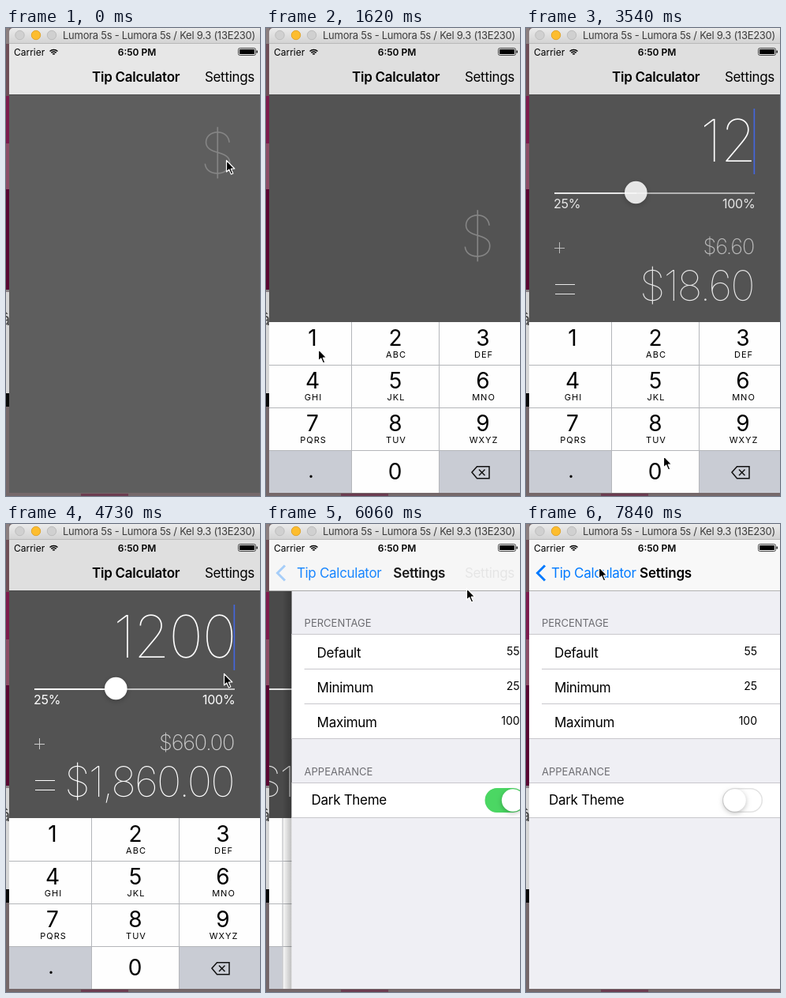
An HTML page with a canvas that plays this animation: 322x592 px, repeating every 8000 ms.

```html
<!DOCTYPE html>
<html lang="en">
<head>
<meta charset="utf-8">
<title>Tip Calculator</title>
<style>
  html, body { margin: 0; width: 100%; height: 100%; overflow: hidden; }
  canvas { display: block; }
</style>
</head>
<body>
<canvas id="stage" width="322" height="592"></canvas>
<script>
const ctx = document.getElementById('stage').getContext('2d');
const LOOP = 8000, TICK = 147.5, LEFT = 4, WIDTH = 320;
const BLUE = '#007aff';

const clamp = v => Math.max(0, Math.min(1, v));
const ramp = (t, start, length) => clamp((t - start) / length);
const smooth = u => u * u * (3 - 2 * u);
const easeOut = u => 1 - (1 - u) ** 3;
const mix = (a, b, u) => a + (b - a) * u;
const gray = v => `rgb(${v},${v},${v})`;

// time, x, y of the pointer tip
const pointerPath = [
  [0, 279, 167], [740, 279, 167], [1622, 66, 406], [1910, 59, 404], [2300, 59, 404],
  [2750, 163, 404], [3020, 163, 404], [3540, 174, 541], [3690, 170, 556], [4430, 170, 556],
  [4720, 276, 189], [5010, 307, 110], [5600, 258, 70], [5900, 258, 70], [6047, 254, 81],
  [6800, 257, 341], [6950, 255, 342], [7260, 255, 342], [7800, 92, 54]
];

function rect(x, y, w, h, color) {
  ctx.fillStyle = color;
  ctx.fillRect(x, y, w, h);
}

function shape(fill, stroke, lineWidth = 1) {
  if (fill) { ctx.fillStyle = fill; ctx.fill(); }
  if (stroke) { ctx.strokeStyle = stroke; ctx.lineWidth = lineWidth; ctx.stroke(); }
}

function circle(x, y, r, fill, stroke) {
  ctx.beginPath();
  ctx.arc(x, y, r, 0, 7);
  shape(fill, stroke);
}

function polyline(points, fill, stroke, lineWidth, closed) {
  ctx.beginPath();
  points.forEach(([x, y]) => ctx.lineTo(x, y));
  if (closed) ctx.closePath();
  shape(fill, stroke, lineWidth);
}

function text(str, x, y, size, { weight = 400, color = '#000', align = 'left', spacing = 0 } = {}) {
  ctx.font = `${weight} ${size}px Inter, sans-serif`;
  ctx.letterSpacing = spacing + 'px';
  ctx.textAlign = align;
  ctx.fillStyle = color;
  ctx.fillText(str, x, y);
}

function layer(alpha, draw, dx = 0, dy = 0) {
  ctx.save();
  ctx.globalAlpha *= alpha;
  ctx.translate(dx, dy);
  draw();
  ctx.restore();
}

function knob(x, y) {
  ctx.save();
  ctx.shadowColor = 'rgba(0,0,0,.25)';
  ctx.shadowBlur = 6;
  ctx.shadowOffsetY = 2;
  circle(x, y, 14.3, '#fff');
  ctx.restore();
}

function desktop() {
  rect(0, 0, 322, 592, '#75686a');
  const bands = [[0, 20, '#8b7f80'], [20, 66, '#6f4f58'], [86, 60, '#7c1b4d'], [146, 58, '#8c4e66'],
    [204, 127, '#590632'], [331, 3, '#8d8488'], [334, 128, '#d6d6d6'], [462, 17, '#080808']];
  bands.forEach(([y, h, color]) => rect(0, y, LEFT, h, color));
  text('â', -7, 376, 22, { color: '#444' });
  rect(95, 589, 60, 3, '#6b3c50');
}

function titleBar() {
  const fill = ctx.createLinearGradient(0, 0, 0, 20);
  fill.addColorStop(0, '#ebebeb');
  fill.addColorStop(1, '#d2d2d2');
  ctx.beginPath();
  ctx.roundRect(LEFT, 0, 330, 20, [5, 0, 0, 0]);
  shape(fill);
  rect(LEFT, 19, WIDTH, 1, '#b9b9b9');
  circle(17.5, 9, 5.7, '#d0d0d0', '#bdbdbd');
  circle(38, 9, 5.7, '#fdbd2e', '#e2a52a');
  circle(58, 9, 5.7, '#d0d0d0', '#bdbdbd');
  text('Lumora 5s - Lumora 5s / Kel 9.3 (13E230)', 316, 14, 13, { color: '#3c3c3c', align: 'right', spacing: -0.27 });
}

function statusBar() {
  text('Carrier', 10, 35, 12);
  text('6:50 PM', 166, 35, 12, { weight: 600, align: 'center' });
  [2.8, 5.4, 8].forEach(r => {
    ctx.beginPath();
    ctx.arc(60.5, 34.5, r - 1, -Math.PI * 0.75, -Math.PI * 0.25);
    shape(null, '#000', 1.6);
  });
  ctx.beginPath();
  ctx.roundRect(294.5, 25.5, 22, 9, 2);
  shape(null, '#444');
  rect(296, 27, 19, 6, '#000');
  rect(317.5, 28.5, 1.5, 3, '#222');
}

function keyboard(dy, pressed) {
  layer(1, () => {
    const sideKey = '#c9ccd4', line = '#b4b6ba';
    rect(LEFT, 372, WIDTH, 216, '#fefefe');
    rect(LEFT, 535, 104, 53, sideKey);
    rect(220, 535, 104, 53, sideKey);
    if (pressed) rect(109, pressed === '2' ? 372 : 535, 110, 53, sideKey);
    [426, 480, 534].forEach(y => rect(LEFT, y, WIDTH, 1, line));
    [108, 219].forEach(x => rect(x, 372, 1, 216, line));
    const letters = ['', 'ABC', 'DEF', 'GHI', 'JKL', 'MNO', 'PQRS', 'TUV', 'WXYZ'];
    letters.forEach((label, i) => {
      const x = [59, 164, 275][i % 3], y = 372 + 54 * Math.floor(i / 3);
      text(i + 1, x, y + 30, 28, { align: 'center' });
      text(label, x + 1, y + 45, 11, { align: 'center', spacing: 1 });
    });
    text('0', 163.5, 571, 28, { align: 'center' });
    text('.', 57, 569, 26, { align: 'center' });
    polyline([[261, 562], [267.5, 554.7], [283, 554.7], [283, 569.7], [267.5, 569.7]], null, '#111', 1.5, true);
    polyline([[270, 558.5], [277.5, 566]], null, '#111', 1.5);
    polyline([[277.5, 558.5], [270, 566]], null, '#111', 1.5);
  }, 0, dy);
}

function results(amount) {
  const money = v => '$' + v.toLocaleString('en-US', { minimumFractionDigits: 2, maximumFractionDigits: 2 });
  const label = { color: '#fff', spacing: -0.2 };
  rect(36, 208, 104, 2, '#fff');
  rect(140, 208, 150, 2, '#c4c4c4');
  knob(139.3, 208);
  text('25%', 35, 228, 16, label);
  text('100%', 290.5, 228, 16, { ...label, align: 'right' });
  rect(36, 278, 13, 1, '#ccc');
  rect(42, 271, 1, 14, '#ccc');
  rect(37, 324, 25, 1, '#fff');
  rect(37, 336, 25, 1, '#fff');
  text(money(amount * 0.55), 289, 286, 27, { weight: 200, color: '#ccc', align: 'right', spacing: -1.2 });
  text(money(amount * 1.55), 288.5, 345, 53, { weight: 100, color: '#fff', align: 'right', spacing: -2 });
}

function calculator(t, push) {
  const shown = easeOut(ramp(t, 220, 390));
  const typed = [[2212, '1'], [2802, '2'], [3835, '0'], [4130, '0']].filter(([at]) => t >= at - 1);
  const value = typed.map(([, digit]) => digit).join('');
  const last = typed[typed.length - 1];
  const pressed = last && last[1] !== '1' && t < last[0] + 100 ? last[1] : '';

  rect(LEFT, 84, WIDTH, 504, gray(mix(94, 83, shown)));
  layer(1, () => {
    if (!value) {
      text('$', 290, mix(184, 289, shown), 72, { weight: 100, color: '#858585', align: 'right' });
    } else {
      const rise = easeOut(ramp(t, 2150, 400));
      text(value, 291, mix(289, 169, rise), 74, { weight: 100, color: '#fff', align: 'right', spacing: -1.4 });
      const blink = clamp(0.55 + 0.5 * Math.cos((t - 4700) / 1250 * 2 * Math.PI));
      layer(blink, () => rect(288.5, mix(222, 102, rise), 1.7, 83, '#4466dd'));
      layer(smooth(ramp(t, 2350, 1550)), () => results(+value));
    }
    rect(-100, 84, 600, 504, `rgba(0,0,0,${0.12 * push})`);
    keyboard(216 * (1 - shown), pressed);
  }, -96 * push);
}

function settings(t) {
  const line = '#c8c7cc', header = { color: '#6d6d72' };
  const on = 1 - smooth(ramp(t, 7150, 220));
  rect(LEFT, 84, WIDTH, 504, '#efeff4');
  rect(LEFT, 139, WIDTH, 133, '#fff');
  rect(LEFT, 327, WIDTH, 45, '#fff');
  [139, 271, 327, 371].forEach(y => rect(LEFT, y, WIDTH, 1, line));
  [183, 227].forEach(y => rect(20, y, 304, 1, line));
  text('PERCENTAGE', 20, 130, 13, header);
  text('APPEARANCE', 20, 318, 13, header);
  [['Default', 55], ['Minimum', 25], ['Maximum', 100]].forEach(([label, value], i) => {
    text(label, 36, 169 + 44 * i, 17, { spacing: -0.3 });
    text(value, 293, 166 + 44 * i, 14, { align: 'right' });
  });
  text('Dark Theme', 29, 355, 17, { spacing: -0.3 });
  ctx.beginPath();
  ctx.roundRect(249.7, 334.7, 49.6, 29.6, 14.8);
  shape('#fff', '#e2e2e2', 1.5);
  layer(on, () => shape('#4bd763', '#4bd763', 1.5));
  knob(mix(264.5, 284.5, on), 349.5);
}

function navBar(t, push) {
  const shown = ramp(t, 220, 390);
  rect(LEFT, 20, WIDTH, 64, gray(mix(mix(231, 223, shown), 248, push)));
  rect(LEFT, 84, WIDTH, 1, gray(mix(76, 178, push)));
  const title = { weight: 600, spacing: -0.25 }, plain = { spacing: -0.3 };
  const titleX = mix(109, 32, push);
  layer(clamp(1 - 1.4 * push), () => text('Tip Calculator', titleX, 68, 17, title));
  layer((t > 5700 ? 0.25 : 1) * clamp(1 - 0.8 * push) * (push < 1), () =>
    text('Settings', 315, 68, 17, { ...plain, align: 'right' }));
  layer(push, () => {
    text('Tip Calculator', titleX, 68, 17, { ...plain, color: BLUE });
    text('Settings', 177 + 193 * (1 - push), 68, 17, { ...title, align: 'center' });
  });
  layer(push ** 12, () => polyline([[24, 52.5], [14.5, 62], [24, 71.5]], null, BLUE, 3));
}

function pointer(t) {
  let i = pointerPath.findIndex(([at]) => at > t);
  if (i < 0) i = pointerPath.length - 1;
  const [t0, x0, y0] = pointerPath[i - 1], [t1, x1, y1] = pointerPath[i];
  const u = smooth(ramp(t, t0, t1 - t0));
  layer(1, () => {
    ctx.lineJoin = 'round';
    polyline([[0.5, 0.5], [0.5, 15], [3.8, 12], [6.4, 18], [8.8, 17], [6.3, 11.2], [10.8, 11]], '#000', '#fff', 1.2, true);
  }, mix(x0, x1, u), mix(y0, y1, u));
}

function draw(now) {
  const t = Math.floor((now % LOOP + 15) / TICK) * TICK;
  const push = easeOut(ramp(t, 5760, 520));
  desktop();
  layer(1, () => {
    ctx.beginPath();
    ctx.rect(LEFT, 20, WIDTH, 568);
    ctx.clip();
    if (push < 1) calculator(t, push);
    if (push > 0) layer(1, () => {
      const shade = ctx.createLinearGradient(-8, 0, LEFT, 0);
      shade.addColorStop(0, 'rgba(0,0,0,0)');
      shade.addColorStop(1, 'rgba(0,0,0,.25)');
      rect(-8, 84, 12, 504, shade);
      settings(t);
    }, WIDTH * (1 - push));
    navBar(t, push);
    statusBar();
  });
  titleBar();
  pointer(t);
  requestAnimationFrame(() => draw(performance.now()));
}
draw(0);
</script>
</body>
</html>
```
